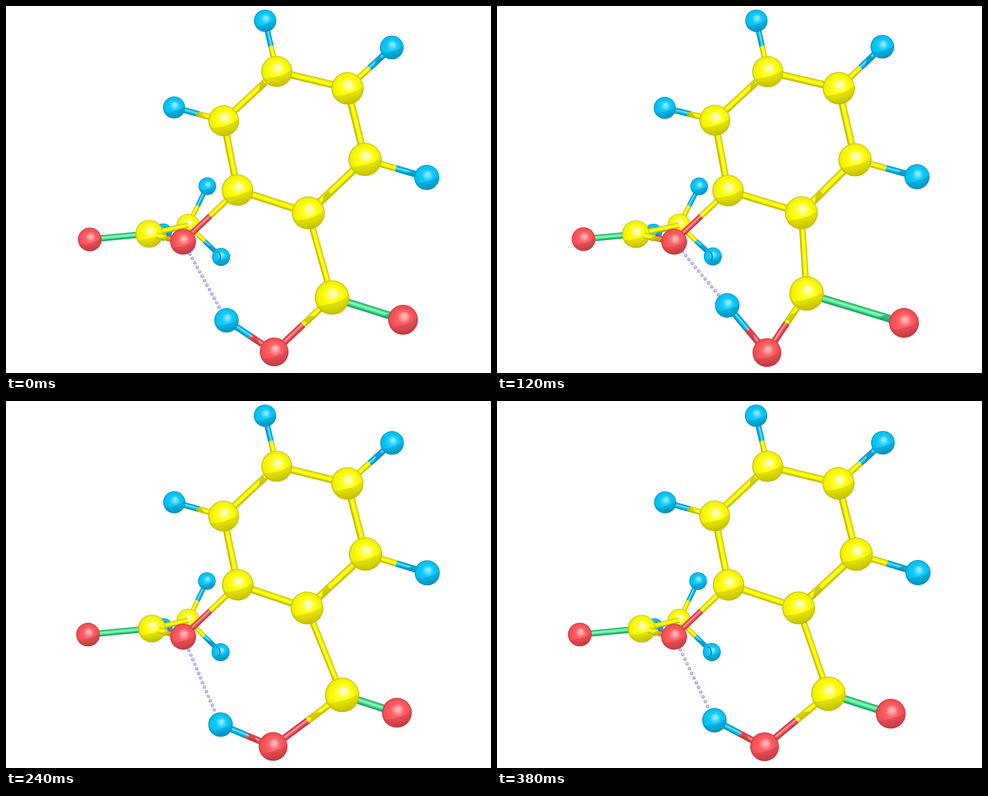
An HTML page with a canvas for the animation above (0.4 s loop, 860 by 651 pixels).

```html
<!DOCTYPE html>
<html lang="en">
<head>
<meta charset="utf-8">
<title>Molecular vibration</title>
<style>
html, body { margin: 0; width: 100%; height: 100%; overflow: hidden; background: #fff; }
canvas { display: block; width: 860px; height: 651px; }
</style>
</head>
<body>
<canvas id="stage" width="860" height="651"></canvas>
<script>
const ctx = document.getElementById('stage').getContext('2d');
const STEP = 20, STEPS = 20;

// Shades: highlight, light, base, edge
const shades = {
  C: ['#ffffc4', '#ffff1c', '#f2f000', '#c2be00'],
  H: ['#8ce6ff', '#14ccf8', '#00bcee', '#0090bc'],
  O: ['#ffb4b4', '#fa6268', '#f44c52', '#c23a42'],
  double: ['#a0fac8', '#5af2a2', '#46e08e', '#22a468'],
  dot: ['#f0f0ff', '#b8b8fa', '#9c9cf0', '#7878d0']
};

// Rest position, radius, vibration amplitude
const atoms = {
  H1: [459.5, 26, 19.8, .4, 0],
  H2: [684, 73.5, 21, -.8, -1.4],
  H3: [298, 180, 19.6, -.5, .8],
  H4: [746, 304, 22.3, -1.4, -1.3],
  H5: [357, 319.5, 15.6, 1.5, .4],
  H6: [279, 401, 15.3, -1.8, .5],
  H7: [381.3, 445, 16, 1.4, -.8],
  H8: [391, 557.5, 21.7, 18.1, -27.9],
  C1: [480, 116, 27.6, 0, .4],
  C2: [605.5, 146, 28.7, .5, -.2],
  C3: [386, 203.5, 27.4, .3, -1],
  C4: [636.5, 272, 29.5, -1.8, .8],
  C5: [410.4, 326.5, 28, -.8, 1],
  C6: [536, 367, 29.2, 3.9, -.2],
  C7: [323, 389, 20.6, 0, 0],
  C8: [254, 404, 24.6, -8.1, .8],
  C9: [578, 517, 30.6, -30.7, -7.4],
  O1: [148.5, 414, 21, 5.2, -.5],
  O2: [314, 418, 23, 0, 0],
  O3: [704, 556.5, 26.4, 18.6, 6],
  O4: [475.5, 613.5, 25.5, 3.3, 1.2]
};

// Back to front: single atoms, or bonds with a width and an optional shaded stretch
const scene = [
  ['C7-H6', 8], ['H6'], ['C7-H5', 8.5], ['H5'], ['C7-H7', 8.5, .55, .8], ['H7'],
  ['C7'], ['C8-C7', 9.5], ['C8=O1', 11], ['O1'], ['C8'], ['C8-O2', 11, .3, .65],
  ['C5-O2', 10.5], ['C1-H1', 10], ['C2-H2', 11, .56, .76], ['C3-H3', 10.5, .35, .55],
  ['C4-H4', 11.5, .64, .85], ['C3-C1', 12.5, .62, .77], ['C1-C2', 13], ['C2-C4', 13],
  ['C3-C5', 12.5], ['C5-C6', 13], ['C6-C4', 13.5, .2, .38], ['C6-C9', 11.5],
  ['C9=O3', 13.5, .72, .87], ['C9-O4', 12, .28, .46], ['O4-H8', 11.5, .26, .46],
  ['H1'], ['H2'], ['H3'], ['H4'], ['C1'], ['C2'], ['C3'], ['C5'], ['C4'], ['C6'],
  ['O2'], ['O3'], ['O4'], ['C9'], ['H8']
];

const mix = (a, b, t) => a + (b - a) * t;

function locate(name, swing) {
  const [x, y, r, dx, dy] = atoms[name];
  return { x: x + dx * swing, y: y + dy * swing, r, kind: name[0] };
}

function ball({ x, y, r, kind }) {
  const [glow, light, base, edge] = shades[kind];
  const g = ctx.createRadialGradient(x + r * .1, y - r * .28, 0, x, y, r);
  g.addColorStop(0, glow);
  g.addColorStop(.12, glow);
  g.addColorStop(.42, light);
  g.addColorStop(.88, base);
  g.addColorStop(1, edge);
  ctx.fillStyle = g;
  ctx.beginPath();
  ctx.arc(x, y, r, 0, Math.PI * 2);
  ctx.fill();
  if (kind === 'dot') return;

  // The lower side lies beyond the reach of the second light.
  const shadow = ctx.createLinearGradient(x, y, x + r * .25, y + r);
  shadow.addColorStop(0, edge + '50');
  shadow.addColorStop(.5, edge + '80');
  shadow.addColorStop(1, edge);
  ctx.save();
  ctx.clip();
  ctx.fillStyle = shadow;
  ctx.beginPath();
  ctx.moveTo(x - r, y + r * .48);
  ctx.quadraticCurveTo(x + r * .35, y + r * .42, x + r, y - r * .15);
  ctx.lineTo(x + r, y + r);
  ctx.lineTo(x - r, y + r);
  ctx.fill();
  ctx.restore();
}

function rod(length, width, from, to, kind) {
  const [glow, light, base, edge] = shades[kind];
  const g = ctx.createLinearGradient(0, -width / 2, 0, width / 2);
  g.addColorStop(0, edge);
  g.addColorStop(.25, base);
  g.addColorStop(.4, kind === 'C' ? light : glow);
  g.addColorStop(.55, light);
  g.addColorStop(.68, base);
  g.addColorStop(.85, edge);
  g.addColorStop(1, edge);
  ctx.fillStyle = g;
  ctx.fillRect(length * from, -width / 2, length * (to - from), width);
}

function bond(link, width, shadeFrom, shadeTo, swing) {
  const [a, b] = link.split(/[-=]/).map(name => locate(name, swing));
  const dx = b.x - a.x, dy = b.y - a.y, length = Math.hypot(dx, dy);
  const start = link === 'C8-O2' ? .22 : 0;
  ctx.save();
  ctx.translate(a.x, a.y);
  ctx.rotate(Math.atan2(dy, dx));
  if (dx < 0) ctx.scale(1, -1);
  if (link.includes('=')) {
    rod(length, width, 0, 1, 'double');
  } else {
    rod(length, width, start, .5, a.kind);
    rod(length, width, .5, 1, b.kind);
  }
  if (shadeTo) {
    const kind = link.includes('=') ? 'double' : (shadeFrom + shadeTo > 1 ? b : a).kind;
    const h = width / 2;
    ctx.globalAlpha = .75;
    ctx.fillStyle = shades[kind][3];
    ctx.beginPath();
    ctx.moveTo(length * shadeFrom, h);
    ctx.lineTo(length * mix(shadeFrom, shadeTo, .5), -h * .5);
    ctx.lineTo(length * shadeTo, -h * .7);
    ctx.lineTo(length * shadeTo, h);
    ctx.fill();
  }
  ctx.restore();
}

// Dark rim where a bond enters the near face of an atom
function socket({ x, y }, offset) {
  ctx.strokeStyle = '#0080a8';
  ctx.lineWidth = 2;
  ctx.beginPath();
  ctx.ellipse(x + offset, y - 1, 5, 8, -.2, -1.6, 1.8);
  ctx.stroke();
}

function hydrogenBond(swing) {
  const a = locate('O2', swing), b = locate('H8', swing);
  const gaps = Math.round(Math.hypot(b.x - a.x, b.y - a.y) * .675 / 8.9);
  for (let i = 0; i <= gaps; i++) {
    const t = mix(.157, .833, i / gaps);
    ball({ x: mix(a.x, b.x, t), y: mix(a.y, b.y, t), r: 2.9, kind: 'dot' });
  }
}

function draw(time) {
  const step = Math.floor(time / STEP) % STEPS;
  const swing = Math.sin(step / STEPS * Math.PI * 2);
  ctx.fillStyle = '#fff';
  ctx.fillRect(0, 0, 860, 651);
  hydrogenBond(swing);
  for (const [item, width, shadeFrom, shadeTo] of scene) {
    if (width) {
      bond(item, width, shadeFrom, shadeTo, swing);
    } else {
      const atom = locate(item, swing);
      ball(atom);
      if (item === 'H6') socket(atom, 3);
      if (item === 'H7') socket(atom, -6);
    }
  }
}

function tick() {
  draw(performance.now());
  requestAnimationFrame(tick);
}
tick();
</script>
</body>
</html>
```
